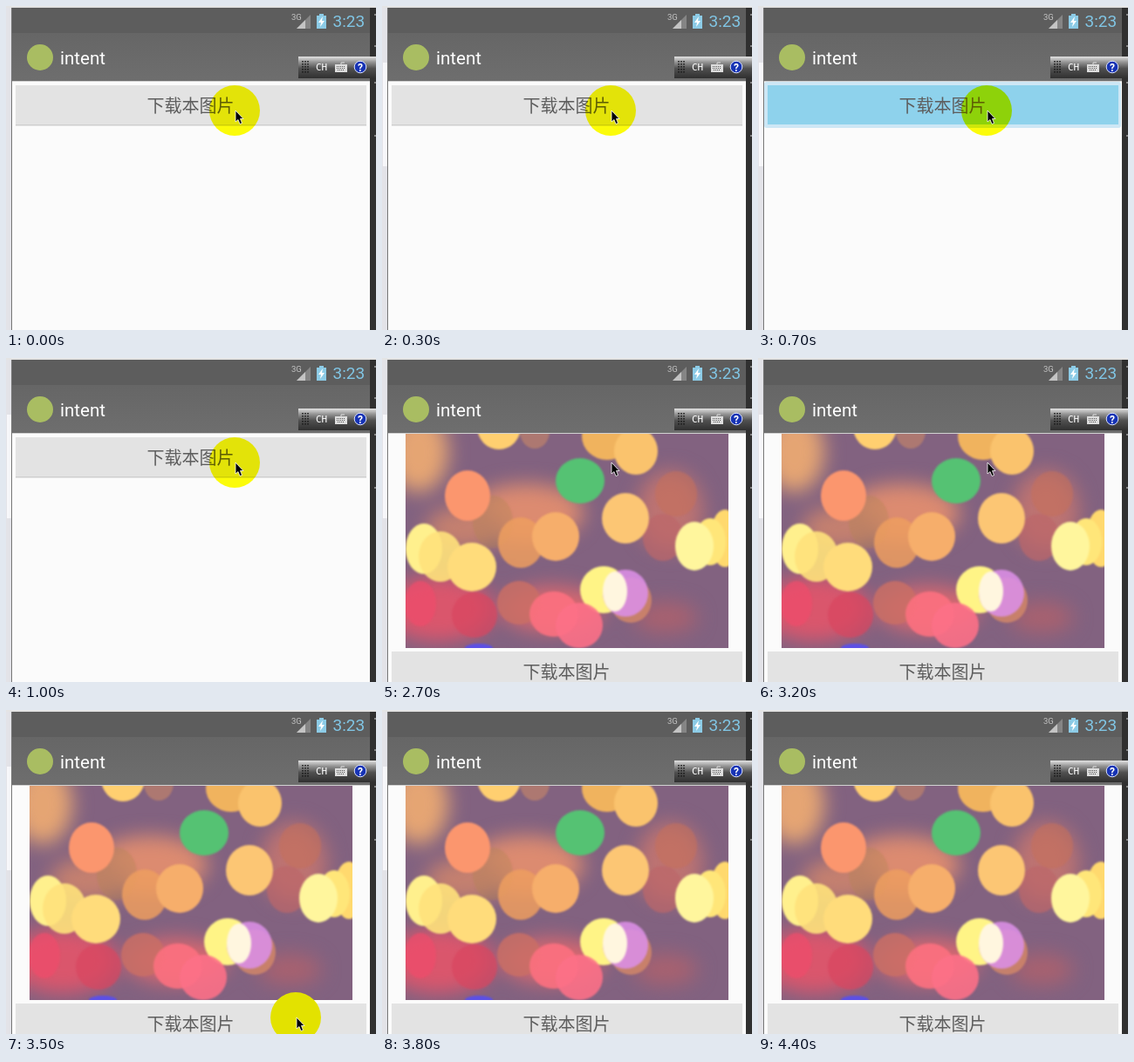
Write an HTML page that moves like this. It is 424 px wide and 372 px high and loops after 4500 ms.

```html
<!DOCTYPE html>
<html lang="zh-CN">
<head>
<meta charset="utf-8">
<title>intent</title>
<style>
html, body { margin: 0; width: 100%; height: 100%; overflow: hidden; background: #fbfbfb; }
svg { display: block; width: 424px; height: 372px; }
text { font-family: Roboto, "Noto Sans", sans-serif; }
.label { font: 20px "Noto Sans CJK SC", "Noto Sans CJK", sans-serif; fill: #5e5e5e; }
#halo { fill: #ff0; fill-opacity: .96; mix-blend-mode: multiply; }
#halo.opaque { fill: #e3e200; fill-opacity: 1; mix-blend-mode: normal; }
</style>
</head>
<body>
<svg viewBox="0 0 424 372">
  <defs>
    <linearGradient id="bar" x2="0" y2="1">
      <stop stop-color="#666"/><stop offset="1" stop-color="#6e6e6e"/>
    </linearGradient>
    <linearGradient id="tray" x2="0" y2="1">
      <stop stop-color="#e2e2e2"/><stop offset=".25" stop-color="#969696"/>
      <stop offset=".55" stop-color="#505050"/><stop offset="1" stop-color="#303030"/>
    </linearGradient>
    <filter id="haze" x="-20%" y="-20%" width="140%" height="140%" color-interpolation-filters="sRGB">
      <feGaussianBlur stdDeviation="11"/>
    </filter>
    <filter id="soft" color-interpolation-filters="sRGB"><feGaussianBlur stdDeviation="1.2"/></filter>
    <clipPath id="frame"><path d="M27 86H397V333H27Z"/></clipPath>
  </defs>

  <path fill="#fbfbfb" d="M0 0H424V372H0Z"/>
  <path fill="#e3e3e8" d="M0 0H6V372H0Z"/>
  <path id="notch" fill="#f7f7fa" d="M1 65H6V184H1Z"/>
  <path fill="#e4e4e4" d="M0 0H424V2H0Z"/>
  <path fill="#777" d="M6 2H7V372H6Z"/>

  <g id="photo" clip-path="url(#frame)">
    <path fill="#826280" d="M27 86H397V333H27Z"/>
    <g id="glow" filter="url(#haze)"></g>
    <g id="lights" filter="url(#soft)"></g>
  </g>

  <g id="button">
    <path fill="#cecece" d="M11 92H413V137.500H11Z"/>
    <path fill="#e3e3e3" d="M11 91H413V136H11Z"/>
    <g id="press">
      <rect x="7" y="87" width="409" height="53" rx="3" fill="#cde7f5"/>
      <path fill="#8ed2ec" d="M11 91H413V136H11Z"/>
    </g>
    <text class="label" x="161.500" y="122">下载本图片</text>
  </g>

  <path fill="#5d5d5d" d="M7 2H417V31H7Z"/>
  <path fill="url(#bar)" d="M7 31H417V86H7Z"/>
  <path fill="#d2d2d2" d="M7 86H417V87H7Z"/>
  <circle cx="39" cy="59" r="15" fill="#a9bd62"/>
  <text x="62" y="67" font-size="20.500" fill="#fff">intent</text>
  <text x="327" y="16" font-size="9.500" fill="#c4c4c4">3G</text>
  <path fill="#858585" d="M333 26L349 10V26Z"/>
  <path fill="#c4c4c4" d="M333 26L343 16V26Z"/>
  <path fill="#8ccbe6" d="M359 9H364V11H367V26H356V11H359Z"/>
  <path fill="#fff" d="M363 12L358 19H361L360 24L365 17H362Z"/>
  <text x="374.500" y="24" font-size="19" fill="#80c5e4">3:23</text>

  <path fill="#303030" d="M417 2H424V372H417Z"/>
  <path stroke="#858585" stroke-width="2" d="M422 10H424M422 46H424M422 88H424M422 149H424"/>
  <path fill="url(#tray)" d="M335 58H424V83H335Z"/>
  <path stroke="#161616" stroke-width="1.500" stroke-dasharray="1.500 1.500" d="M340 63V78M343 63V78M346 63V78"/>
  <text x="355" y="74" font-size="11" style="font-family:'DejaVu Sans Mono',monospace" fill="#fff">CH</text>
  <path fill="#ddd" d="M377 67H391V76H377Z"/>
  <path stroke="#555" stroke-dasharray="1 1" d="M379 69.500H389M379 71.500H389M380 73.500H388"/>
  <path fill="none" stroke="#ddd" d="M384 67V65H388"/>
  <circle cx="406" cy="70" r="6.800" fill="#1733b4" stroke="#dce3ff"/>
  <text x="406" y="74.500" font-size="12" font-weight="bold" text-anchor="middle" fill="#fff">?</text>

  <circle id="halo" r="29"/>
  <path id="arrow" fill="#000" stroke="#fff" stroke-width=".8" d="M0 0V13L3 10.500L5 15.500L7.500 14.500L5.500 9.500H9Z"/>
</svg>
<script>
const $ = id => document.getElementById(id);
const LOOP = 4500, STEP = 100;

// blob: colour, opacity, centre, radii
function addBlobs(group, blobs) {
  for (const [fill, opacity, cx, cy, rx, ry] of blobs) {
    const blob = document.createElementNS("http://www.w3.org/2000/svg", "ellipse");
    for (const [name, value] of Object.entries({ fill, opacity, cx, cy, rx, ry })) blob.setAttribute(name, value);
    group.append(blob);
  }
}

addBlobs($("glow"), [
  ["#e5a573", 1, 42, 108, 34, 46], ["#dc8b70", 1, 165, 178, 66, 34],
  ["#c4806f", 1, 95, 195, 45, 25], ["#da566c", 1, 65, 288, 62, 38],
  ["#d9686f", 1, 195, 288, 58, 26], ["#bd7371", 1, 330, 175, 38, 46],
  ["#a8616f", 1, 325, 298, 36, 18]
]);
addBlobs($("lights"), [
  ["#b18352", .35, 127, 188, 23, 30], ["#c5715d", .6, 337, 156, 24, 26],
  ["#bd676a", .7, 322, 206, 23, 27], ["#c96f65", .85, 157, 281, 25, 25],
  ["#d94660", .7, 106, 295, 26, 26], ["#ef4c6c", .7, 44, 282, 18, 26],
  ["#ee9c5b", .4, 175, 84, 17, 20], ["#ffcf70", 1, 134, 79, 25, 26],
  ["#f0b35e", 1, 258, 90, 29, 27], ["#fac36d", 1, 291, 107, 25, 27],
  ["#fb966e", 1, 98, 158, 26, 29], ["#55c273", 1, 227, 141, 28, 26],
  ["#fcc674", 1, 279, 184, 27, 29], ["#ee9e60", .85, 159, 212, 26, 29],
  ["#f6ae6b", 1, 199, 205, 27, 28], ["#fff08d", 1, 48, 219, 21, 29],
  ["#ffe37c", .9, 67, 228, 25, 29], ["#ffdc7b", 1, 103, 240, 28, 28],
  ["#ffd96e", 1, 393, 207, 17, 33], ["#ffe679", 1, 376, 211, 18, 27],
  ["#fff69d", 1, 358, 216, 22, 28],
  ["#d58968", .8, 285, 278, 24, 26], ["#fff486", 1, 254, 266, 27, 27],
  ["#da8ee4", .9, 279, 270, 26, 27], ["#fff6df", 1, 267, 268, 14, 23],
  ["#fc7080", .9, 197, 294, 28, 26], ["#fc7188", .9, 226, 307, 27, 26],
  ["#5c50e6", 1, 111, 333, 16, 5]
]);

// time, x, y of the pointer tip
const track = [
  [0, 263, 120], [3200, 263, 120], [3500, 333, 353], [3700, 332, 379],
  [3800, 331, 405], [3900, 331, 391], [4000, 331, 381], [4400, 331, 381]
];

function pointerAt(t) {
  const i = track.findIndex(p => p[0] > t);
  if (i < 0) return track.at(-1).slice(1);
  const [a, b] = [track[i - 1], track[i]];
  const k = (t - a[0]) / (b[0] - a[0]);
  return [a[1] + (b[1] - a[1]) * k, a[2] + (b[2] - a[2]) * k];
}

const show = (id, on) => $(id).setAttribute("visibility", on ? "visible" : "hidden");

function draw(now) {
  const t = Math.floor(now % LOOP / STEP) * STEP;
  const loaded = t >= 2700, gone = t >= 4400;
  const [x, y] = pointerAt(t);
  show("photo", loaded);
  show("notch", t >= 100 && !gone);
  show("halo", !gone && (!loaded || t >= 3300));
  show("arrow", !gone);
  $("button").setAttribute("transform", `translate(0 ${loaded ? 246 : 0})`);
  $("press").setAttribute("opacity", t < 600 ? 0 : Math.max(0, Math.min(1, (1000 - t) / 300)));
  $("halo").classList.toggle("opaque", loaded);
  $("halo").setAttribute("transform", `translate(${x - 1} ${y})`);
  $("arrow").setAttribute("transform", `translate(${x} ${y})`);
  requestAnimationFrame(draw);
}
draw(performance.now());
</script>
</body>
</html>
```
